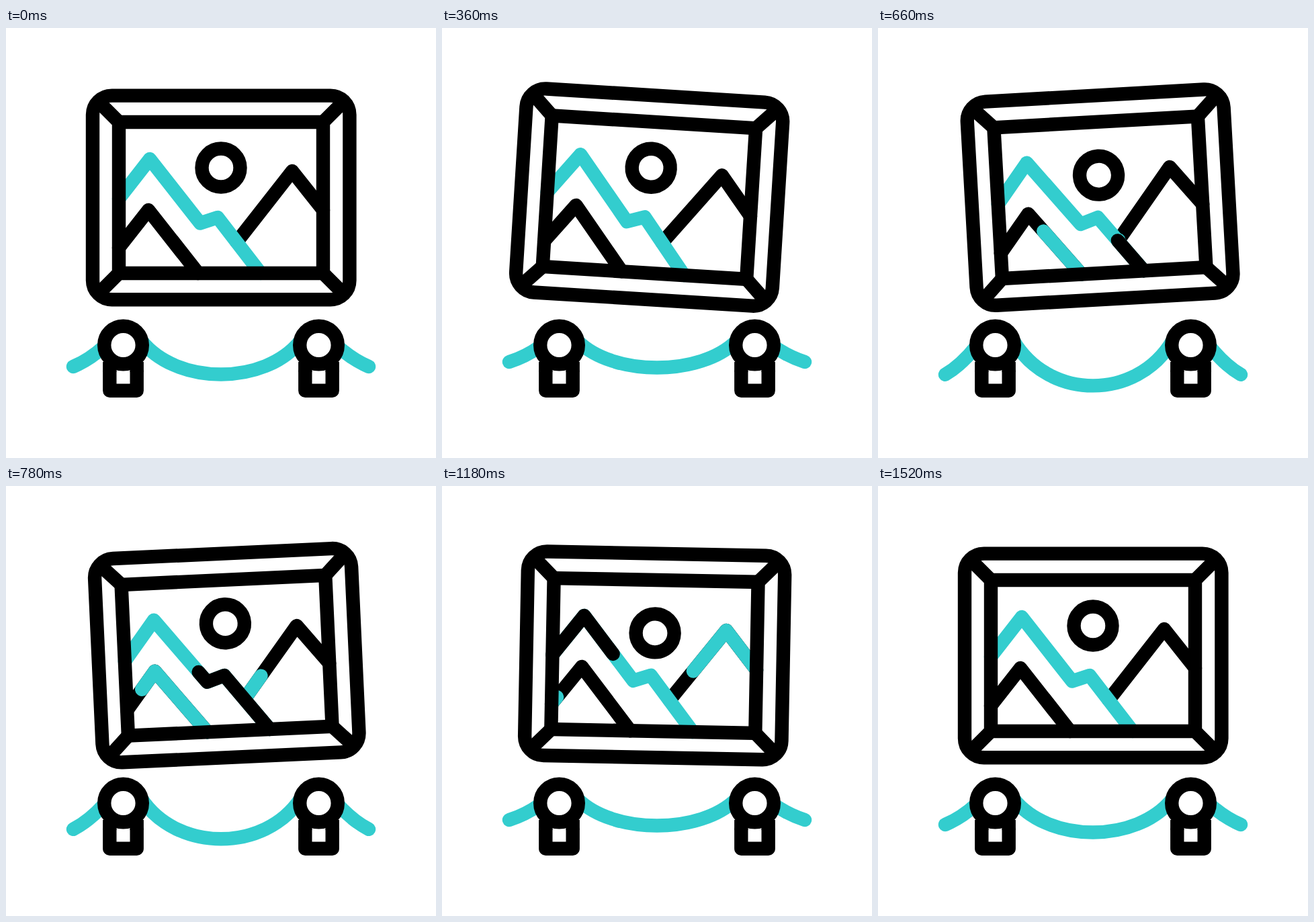
An HTML page that plays this animation: 640x640 px, repeating every 1.66 s.

```html
<!DOCTYPE html>
<html>
<head>
<meta charset="utf-8">
<style>
  html, body { margin: 0; width: 100%; height: 100%; overflow: hidden; background: #fff; }
  svg { display: block; width: 100vw; height: 100vh; }
  .line { fill: none; stroke-width: 20.4; stroke-linejoin: round; stroke-linecap: round; }
  .ink { stroke: #000; }
  .aqua { stroke: #33cdce; }
  .sharp { stroke-linejoin: miter; stroke-linecap: butt; }
</style>
</head>
<body>
<svg viewBox="0 0 640 640">
  <defs>
    <g id="post" class="line ink">
      <path class="sharp" d="M-20.2 25V40M20.2 25V40"/>
      <path d="M-20.2 40V67.8H20.2V40"/>
      <circle r="28.3" fill="#fff"/>
    </g>
  </defs>
  <g id="picture" class="line">
    <g id="hills"></g>
    <circle id="sun" class="ink" cx="320" cy="208" r="28.5"/>
    <g class="ink">
      <rect x="129" y="100.6" width="382.4" height="303.6" rx="28.5"/>
      <path class="sharp" d="M168 140H472V365H168Z"/>
      <path class="sharp" d="M168 140l-31-31M472 140l31-31M168 365l-31 31M472 365l31 31"/>
    </g>
  </g>
  <path id="rope" class="line aqua"/>
  <use href="#post" x="174.5" y="472"/>
  <use href="#post" x="465.5" y="472"/>
</svg>
<script>
const LOOP = 1660, STEP = 20;
const $ = id => document.getElementById(id);

// Keys are [ms, value]; the curve is flat at turning points and smooth elsewhere.
const SWING = [[200, 0], [410, 4.15], [720, -4], [914, 2], [1480, 0]];
const SUN = [[340, 0], [545, 18.8], [895, -10.5], [1190, 11], [1510, 0]];
const SAG = [[200, 0], [360, -10], [520, -20.5], [540, -20], [650, 17], [760, 10.8],
             [780, 9.8], [1000, -5], [1120, -10.6], [1180, -10], [1520, 0]];

function slope(keys, i) {
  if (i <= 0 || i >= keys.length - 1) return 0;
  const rate = j => (keys[j + 1][1] - keys[j][1]) / (keys[j + 1][0] - keys[j][0]);
  const a = rate(i - 1), b = rate(i);
  return a * b <= 0 ? 0 : 2 * a * b / (a + b);
}

function at(keys, t) {
  const next = keys.findIndex(k => k[0] > t);
  if (next === 0) return keys[0][1];
  if (next < 0) return keys[keys.length - 1][1];
  const [t0, v0] = keys[next - 1], [t1, v1] = keys[next];
  const d = t1 - t0, u = (t - t0) / d, ease = u * u * (3 - 2 * u);
  return v0 + (v1 - v0) * ease
    + d * u * (1 - u) * (slope(keys, next - 1) * (1 - u) - slope(keys, next) * u);
}

// Each hill has a second colour that runs along it: head and tail are time spans.
const hills = [
  { d: 'M343.5 318.4L426 213L472 271', base: 'ink', wipe: 'aqua', head: [638, 1128], tail: [1044, 1444] },
  { d: 'M379 365L315 282L289 290.5L214 195L168 254', base: 'aqua', wipe: 'ink', head: [500, 1090], tail: [960, 1370] },
  { d: 'M286 365L212 271L168 327', base: 'ink', wipe: 'aqua', head: [436, 918], tail: [844, 1243] }
];

function addPath(d, cls) {
  const path = document.createElementNS('http://www.w3.org/2000/svg', 'path');
  path.setAttribute('d', d);
  path.setAttribute('class', cls);
  path.setAttribute('pathLength', 1);
  return $('hills').appendChild(path);
}

for (const hill of hills) {
  addPath(hill.d, hill.base);
  hill.path = addPath(hill.d, hill.wipe);
}

const progress = ([from, to], t) => at([[from, 0], [to, 1]], t);

function drawRope(sag) {
  const tip = 504 + 0.7 * sag, bend = 494 + 0.45 * sag, low = 532 + sag * 4 / 3;
  $('rope').setAttribute('d',
    `M100 ${tip}Q124 ${bend} 146 474M202 466C255 ${low} 385 ${low} 438 466M494 474Q516 ${bend} 540 ${tip}`);
}

function draw(now) {
  const t = Math.floor(now % LOOP / STEP) * STEP;
  $('picture').setAttribute('transform', `rotate(${at(SWING, t)} 320 66)`);
  $('sun').setAttribute('cy', 208 + at(SUN, t));
  drawRope(at(SAG, t));
  for (const { path, head, tail } of hills) {
    const end = progress(head, t), start = progress(tail, t);
    path.style.display = end > start ? '' : 'none';
    path.style.strokeDasharray = `${end - start} 2`;
    path.style.strokeDashoffset = -start;
  }
}

const begin = performance.now();
function tick() {
  draw(performance.now() - begin);
  requestAnimationFrame(tick);
}
tick();
</script>
</body>
</html>
```
